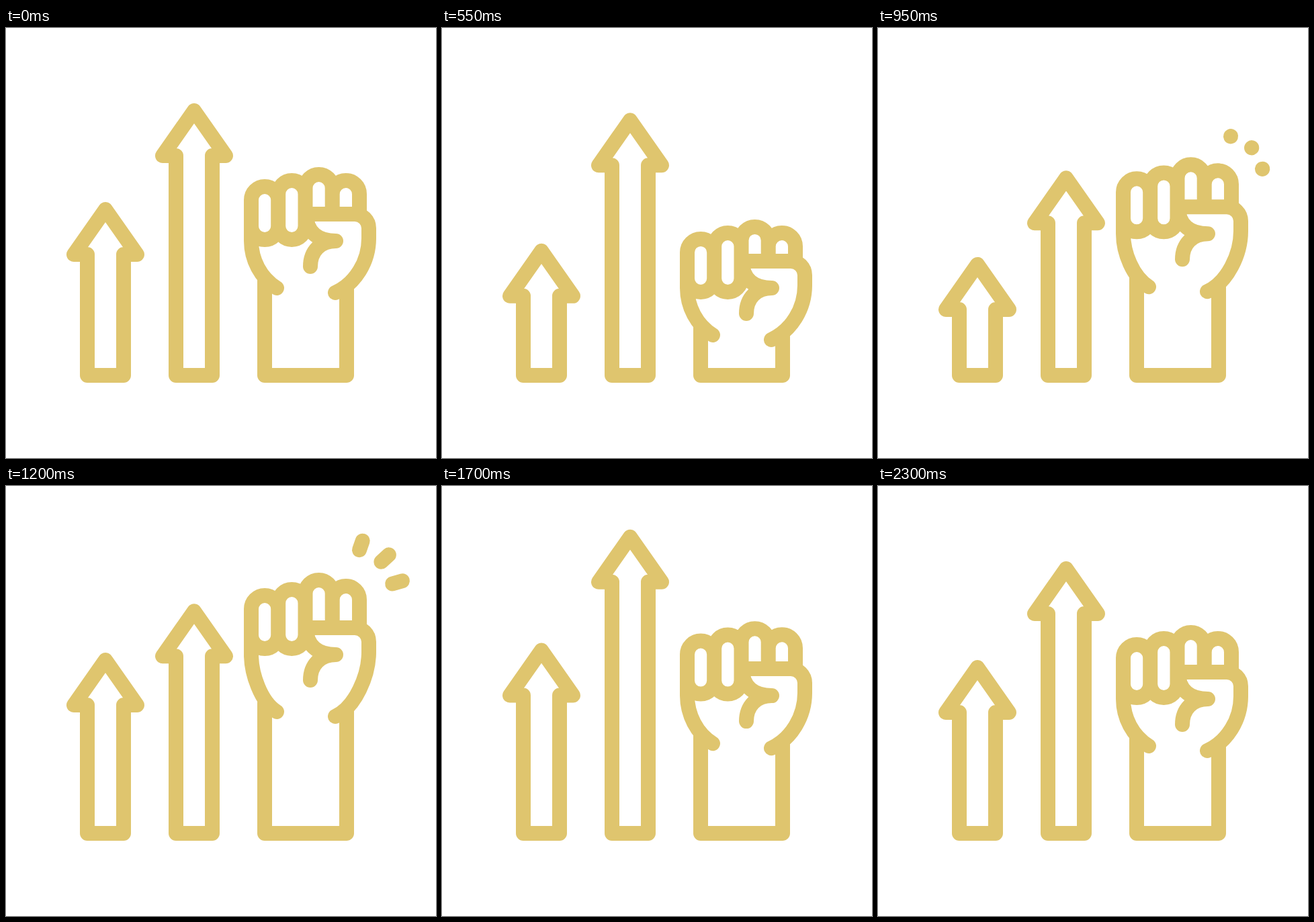
These frames come from a looping animation (640x640 px, 3 s). An HTML page:

```html
<!DOCTYPE html>
<html lang="en">
<head>
<meta charset="utf-8">
<title>Raised fist and arrows</title>
<style>
  html, body { margin: 0; width: 100%; height: 100%; overflow: hidden; background: #fff; }
  svg { display: block; width: 100vw; height: 100vh; }
  path { fill: none; stroke: #dfc56e; stroke-width: 22; stroke-linecap: round; stroke-linejoin: round; }
</style>
</head>
<body>
<svg viewBox="0 0 640 640">
  <path id="arrows"/>
  <path id="fist"/>
  <path id="sparks"/>
</svg>
<script>
const LOOP = 3000, LEG = 600, BASE = 517;
const FINGERS = [365, 405.2, 445.5, 485.7, 526];
// Each spark: inner end, outer end at rest height
const SPARKS = [[525, 176, 532, 156], [556, 193, 573, 177.5], [572, 224.5, 594, 218]];

const [arrows, fist, sparks] = ['arrows', 'fist', 'sparks'].map(id => document.getElementById(id));

const ease = (t, start, span) => {
  const s = Math.min(1, Math.max(0, (t - start) / span));
  return s * s * (3 - 2 * s);
};
const mix = (a, b, k) => a + (b - a) * k;

// Rest, dip to low, jump to high, back to rest
function bounce(t, start, low, high) {
  const y = mix(low * ease(t, start, LEG), high, ease(t, start + LEG, LEG));
  return mix(y, 0, ease(t, start + 2 * LEG, LEG));
}

function arrow(x, tip) {
  const barb = tip + 67;
  return `M${x} ${tip}L${x - 47} ${barb}H${x - 27}V${BASE}H${x + 27}V${barb}H${x + 47}Z`;
}

// Rounded top of a finger, walls down to the given height
function finger(i, top, foot) {
  const a = FINGERS[i], b = FINGERS[i + 1], r = (b - a) / 2;
  return `M${a} ${foot}V${top + r}A${r} ${r} 0 0 1 ${b} ${top + r}V${foot}`;
}

function capsule(i, top, bottom) {
  const a = FINGERS[i], r = (FINGERS[i + 1] - a) / 2;
  return finger(i, top, bottom - r) + `A${r} ${r} 0 0 1 ${a} ${bottom - r}Z`;
}

function hand(t) {
  const f = bounce(t, 0, 80.2, -73);
  const g = bounce(t, 0, 80.2, -78);
  const p = bounce(t, 0, 72, -66);
  const w = bounce(t, 0, 72, -51);
  return capsule(0, 236 + f, 315 + f) + capsule(1, 227 + f, 315 + f) +
    finger(2, 218 + g, 277 + p) + finger(3, 227 + g, 277 + p) +
    // Palm edge and right side
    `M447 ${277 + p}H519A21 21 0 0 1 540 ${298 + p}V${313 + p}` +
    `C540 ${348 + p} 520 ${380 + w} 490 ${394 + w}` +
    // Thumb
    `M447 ${277 + p}C447 ${300 + p} 460 ${317 + p} 491 ${317 + p}` +
    `C468 ${317 + p} 453 ${332 + p} 453 ${355 + p}` +
    // Left side
    `M365 ${295 + f}V${317 + p}C365 ${345 + p} 379 ${372 + w} 403 ${387 + w}` +
    // Forearm
    `M385 ${374 + w}V${BASE}H507V${387 + w}`;
}

function rays(t) {
  const from = ease(t, 1105, 400), to = ease(t, 910, 400);
  if (to <= from) return '';
  const g = bounce(t, 0, 80.2, -78);
  return SPARKS.map(([x, y, u, v]) =>
    `M${mix(x, u, from)} ${mix(y, v, from) + g}L${mix(x, u, to)} ${mix(y, v, to) + g}`).join('');
}

function draw() {
  // Held for 50 ms per step, sampled on a 20 ms grid
  const step = Math.floor(performance.now() % LOOP / 50);
  const t = Math.floor(step * 2.5) * 20;
  arrows.setAttribute('d',
    arrow(148, 270 + bounce(t, 200, 103.2, -51)) +
    arrow(280, 123 + bounce(t, 400, 103.2, -51)));
  fist.setAttribute('d', hand(t));
  sparks.setAttribute('d', rays(t));
  requestAnimationFrame(draw);
}
draw();
</script>
</body>
</html>
```
